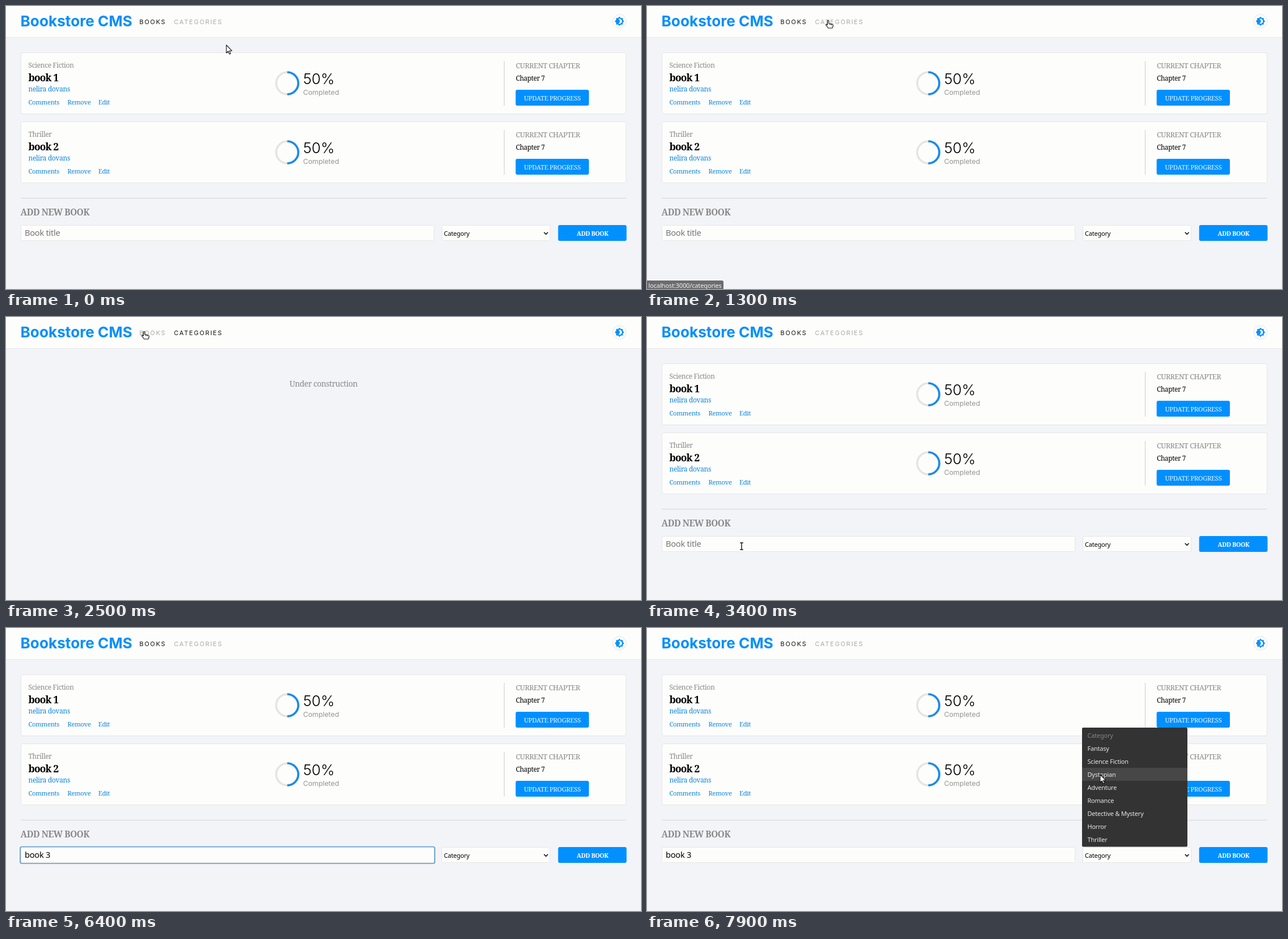
An HTML page for the animation above (8000 ms loop, 1121 px wide and 500 px high).

```html
<!DOCTYPE html>
<html lang="en">
<head>
<meta charset="utf-8">
<title>Bookstore CMS</title>
<style>
  html, body { margin: 0; width: 100%; height: 100%; overflow: hidden; background: #f3f4f8; }
  svg { display: block; width: 100%; height: 100%; }
  text { white-space: pre; }
  .sans { font-family: Inter, sans-serif; }
  .slab { font-family: "Noto Serif", serif; letter-spacing: -.03em; }
  .ui { font-family: "Noto Sans", sans-serif; letter-spacing: -.02em; }
  .bold { font-weight: 700; }
  .light { font-weight: 300; }
  .nav { letter-spacing: 1.75px; }
  .tight { letter-spacing: -.045em; }
  .mid { text-anchor: middle; }
  .panel { fill: #fdfdfc; stroke: #e6e6e6; }
</style>
</head>
<body>
<svg id="stage" viewBox="0 0 1121 500"></svg>
<script>
const BLUE = '#0290ff', LINK = '#0d85dd', GREY = '#888', LOOP = 8000;

const text = (x, y, size, fill, cls, str, id = '') =>
  `<text id="${id}" x="${x}" y="${y}" font-size="${size}" fill="${fill}" class="${cls}">${str}</text>`;
const rect = (x, y, w, h, attrs) =>
  `<rect x="${x}" y="${y}" width="${w}" height="${h}" ${attrs}/>`;

const card = (y, category, title) => `<g transform="translate(0 ${y})">
  ${rect(26.5, .5, 1068, 108, 'rx="3.5" class="panel"')}
  ${text(39.5, 26.5, 12, GREY, 'slab', category)}
  ${text(39.5, 51, 17.3, '#000', 'slab bold tight', title)}
  ${text(39.5, 68.5, 12, LINK, 'slab', 'nelira dovans')}
  ${text(39.5, 92, 11.3, LINK, 'slab', 'Comments')}
  ${text(108.5, 92, 11.3, LINK, 'slab', 'Remove')}
  ${text(163, 92, 11.3, LINK, 'slab', 'Edit')}
  <g fill="none" stroke-width="3.7">
    <circle cx="496.5" cy="54.5" r="19.5" stroke="#e5e5e5"/>
    <path d="M496.5 35a19.5 19.5 0 0 1 0 39" stroke="#1b8aec"/>
  </g>
  ${text(524.5, 56, 26, '#000', 'sans light', '50%')}
  ${text(524.5, 74.5, 12.3, '#959595', 'sans', 'Completed')}
  <path d="M879.5 15V94" stroke="#cfcfc5"/>
  ${text(900, 27.5, 12.5, GREY, 'slab', 'CURRENT CHAPTER')}
  ${text(900, 50, 11.8, '#000', 'slab', 'Chapter 7')}
  ${rect(899.7, 66, 129.3, 28, `rx="3" fill="${BLUE}"`)}
  ${text(964.5, 84.5, 11.4, '#e9f5ff', 'slab mid', 'UPDATE PROGRESS')}
</g>`;

const OPTIONS = ['Category', 'Fantasy', 'Science Fiction', 'Dystopian', 'Adventure',
  'Romance', 'Detective &amp; Mystery', 'Horror', 'Thriller'];
const ROW = 23, MENU_TOP = 178;

const stage = document.getElementById('stage');
stage.innerHTML = `
  ${rect(0, 0, 1121, 500, 'fill="#f3f4f8"')}
  ${rect(0, 0, 1121, 55, 'fill="#fdfdfc"')}
  <path d="M0 55.5H1121" stroke="#e8e8e8"/>
  ${text(25.5, 35.5, 26.2, '#048ff9', 'sans bold', 'Bookstore CMS')}
  ${text(235.5, 31.5, 11, '#111', 'sans nav', 'BOOKS', 'navBooks')}
  ${text(296.5, 31.5, 11, '#aaa', 'sans nav', 'CATEGORIES', 'navCategories')}
  <circle cx="1083" cy="27" r="12" fill="#fefefe" stroke="#e4e4e4"/>
  <path transform="translate(1083 27) scale(.73) translate(-12 -12)" fill="${BLUE}" fill-rule="evenodd"
    d="M20 15.3 23.3 12 20 8.7V4h-4.7L12 .7 8.7 4H4v4.7L.7 12 4 15.3V20h4.7l3.3 3.3 3.3-3.3H20z
       M12 18q-1.3 0-2.5-.55a6 6 0 0 0 0-10.9Q10.7 6 12 6a6 6 0 0 1 0 12z"/>
  <g id="books">
    ${card(82, 'Science Fiction', 'book 1')}
    ${card(204, 'Thriller', 'book 2')}
    <path d="M26 339.5H1095" stroke="#d6d6d9"/>
    ${text(25.5, 370, 15.4, GREY, 'slab bold', 'ADD NEW BOOK')}
    ${rect(26.5, 387.5, 729, 27, 'rx="2" class="panel"')}
    ${rect(25, 386.5, 732, 29.5, 'id="focus" rx="3" fill="none" stroke="#5f9cc9" stroke-width="1.7"')}
    ${text(33, 406, 14.7, '#757575', 'ui', '', 'field')}
    ${rect(0, 392, 1.2, 18, 'id="caret"')}
    ${rect(769.5, 387.5, 191, 27, 'rx="2" class="panel"')}
    ${text(773, 405.5, 11, '#000', 'ui', 'Category')}
    <path d="M949.8 399.8l3.4 3.6 3.4-3.6" fill="none" stroke="#111" stroke-width="1.6"/>
    ${rect(974.7, 387, 120.8, 28, `rx="3" fill="${BLUE}"`)}
    ${text(1035.5, 405.5, 10.6, '#fff', 'slab bold mid', 'ADD BOOK')}
    <g id="menu">
      ${rect(768, 176, 186, 210.5, 'rx="2" fill="#333"')}
      ${rect(768, 0, 186, ROW, 'id="highlight" fill="#474747"')}
      ${OPTIONS.map((o, i) => text(777.5, MENU_TOP + 15.5 + i * ROW, 11, i ? '#e6e6e6' : '#858585', 'ui', o)).join('')}
    </g>
  </g>
  ${text(560.5, 122.5, 13.75, GREY, 'slab mid', 'Under construction', 'construction')}
  <g id="status">
    <path d="M0 485H132q3 0 3 3V500H0z" fill="#6c6c6f"/>
    ${text(2.5, 497.5, 11.2, '#f2f2f2', 'ui', 'localhost:3000/categories')}
  </g>
  <g id="pointer" stroke-linejoin="round">
    <path id="arrow" d="M0 0V14l3.2-3 2.2 5 2.2-1-2.2-4.8H9.8z" fill="#fff" stroke="#111" stroke-width="1.1"/>
    <g id="hand">
      <path d="M-1.5 1q0-1.5 1.3-1.5T1 1V5l5.5 1q2 .3 2 2.2Q8.5 11 7 13H0L-4 8q-.6-1.6.8-1.7L-1.5 7.5z"
        fill="#fff" stroke="#111" stroke-width="1.2"/>
      <path d="M3 5.3V7.5M5.5 6V8" stroke="#111"/>
    </g>
    <g id="beam" fill="none">
      <path d="M-2.8-6H2.8M0-6V6M-2.8 6H2.8" stroke="#fff" stroke-width="3.4"/>
      <path d="M-2.8-6H2.8M0-6V6M-2.8 6H2.8" stroke="#111" stroke-width="1.4"/>
    </g>
  </g>`;

const el = {};
stage.querySelectorAll('[id]').forEach(node => { if (node.id) el[node.id] = node; });
const show = (node, visible) => { node.style.display = visible ? '' : 'none'; };

// Pointer stops: time, x, y
const PATH = [
  [0, 389, 69], [300, 385, 64], [1000, 320, 26], [1800, 320, 26], [2300, 244, 26],
  [2700, 244, 26], [3100, 178, 424], [3400, 167, 405], [6600, 167, 405],
  [6900, 600, 424], [7100, 815, 402], [7300, 815, 398], [7800, 800, 259], [LOOP, 800, 259]
];
// Keystrokes: time, resulting text
const KEYS = [[4400, 'b'], [4500, 'bo'], [4600, 'boo'], [4700, 'book'], [4800, 'book '], [5300, 'book 3']];
const FOCUS = 4000, OPEN = 7200, BLINK = 650;

function pointerAt(t) {
  const i = PATH.findIndex(p => p[0] > t);
  const [t0, x0, y0] = PATH[i - 1], [t1, x1, y1] = PATH[i];
  const k = (t - t0) / (t1 - t0), e = k * k * (3 - 2 * k);
  return [x0 + (x1 - x0) * e, y0 + (y1 - y0) * e];
}

function draw(t) {
  const onCategories = t >= 1500 && t < 2600;
  const menuOpen = t >= OPEN;
  const focused = t >= FOCUS && !menuOpen;
  show(el.books, !onCategories);
  show(el.construction, onCategories);
  el.navBooks.setAttribute('fill', onCategories ? '#aaa' : '#111');
  el.navCategories.setAttribute('fill', onCategories ? '#111' : '#aaa');
  show(el.status, t >= 1000 && t < 1900);

  const [keyTime, typed] = KEYS.filter(k => k[0] <= t).pop() || [FOCUS, ''];
  el.field.textContent = typed || 'Book title';
  el.field.setAttribute('fill', typed ? '#000' : '#757575');
  show(el.focus, focused);
  show(el.caret, focused && Math.floor((t - keyTime) / BLINK) % 2 === 0);
  if (focused) {
    const width = typed ? el.field.getComputedTextLength() : 0;
    el.caret.setAttribute('x', 33 + width);
  }

  const [x, y] = pointerAt(t);
  const overNav = y > 18 && y < 36 && (x > 235 && x < 283 || x > 296 && x < 382);
  const overField = !onCategories && x > 26 && x < 756 && y > 387 && y < 415;
  el.pointer.setAttribute('transform', `translate(${x} ${y})`);
  show(el.pointer, t < 5600 || t >= 6600);
  show(el.hand, overNav);
  show(el.beam, overField);
  show(el.arrow, !overNav && !overField);

  show(el.menu, menuOpen);
  const row = Math.floor((y - MENU_TOP) / ROW);
  show(el.highlight, row > 0 && row < OPTIONS.length);
  el.highlight.setAttribute('y', MENU_TOP + row * ROW);
}

function tick() {
  // The screen advances in steps of 100 ms
  draw(Math.floor(performance.now() % LOOP / 100) * 100);
  requestAnimationFrame(tick);
}
tick();
</script>
</body>
</html>
```
